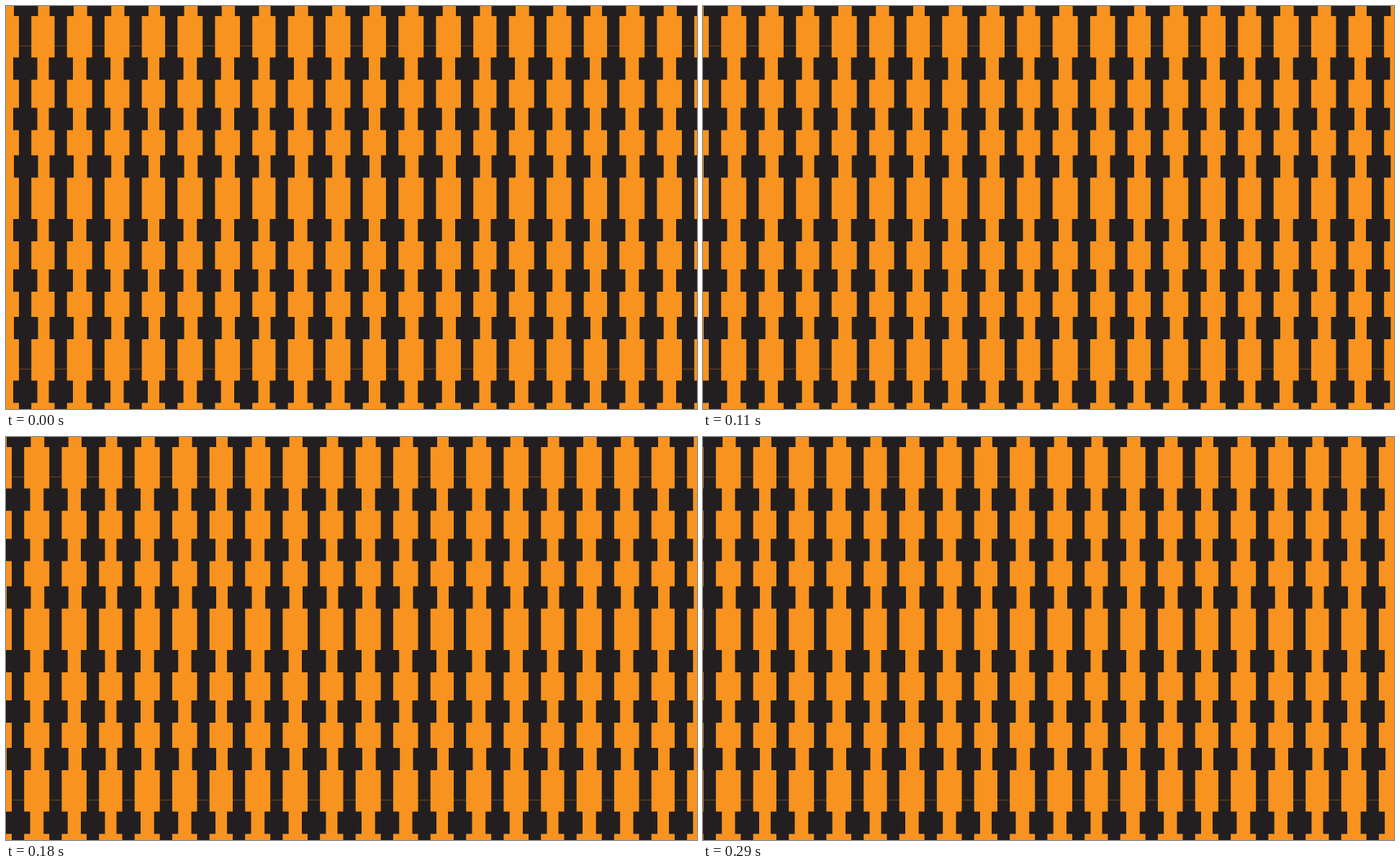
Write an HTML page with a canvas that moves like this. It is 960 px wide and 560 px high and loops after 0.33 s.

```html
<!DOCTYPE html>
<html lang="en">
<head>
<meta charset="utf-8">
<title>Sliding beads</title>
<style>
  html, body { margin: 0; width: 100%; height: 100%; overflow: hidden; background: #f8931f; }
  canvas { display: block; }
</style>
</head>
<body>
<canvas width="960" height="560"></canvas>
<script>
const ctx = document.querySelector('canvas').getContext('2d');
const ORANGE = '#f8931f', BLACK = '#231f20', SEAM = 'rgba(248,147,31,.35)';
const STEP_MS = 110, STEPS = 3, STEP_X = 59.5;
const TILE_W = 153.5, TILE_H = 224.5, BAR_W = 17.2, BEAD_W = 33.5, BEAD_H = 31;
const bars = [0, 49.5, 101.7];
const beads = [[-7, -17], [-8, 71.5], [-8, 141.5]]; // x from the bar, y in the tile
const seams = [55, 504];

function drawBar(x) {
  ctx.fillStyle = BLACK;
  ctx.fillRect(x, 0, BAR_W, 560);
  for (let top = 0; top < 560; top += TILE_H)
    for (const [dx, y] of beads) ctx.fillRect(x + dx, top + y, BEAD_W, BEAD_H);
  ctx.fillStyle = SEAM;
  for (const y of seams) ctx.fillRect(x, y, BAR_W, 1);
}

function draw() {
  const step = Math.floor(performance.now() / STEP_MS) % STEPS;
  ctx.fillStyle = ORANGE;
  ctx.fillRect(0, 0, 960, 560);
  for (let left = 18 - TILE_W - step * STEP_X; left < 970; left += TILE_W)
    for (const x of bars) drawBar(left + x);
  requestAnimationFrame(draw);
}
draw();
</script>
</body>
</html>
```
